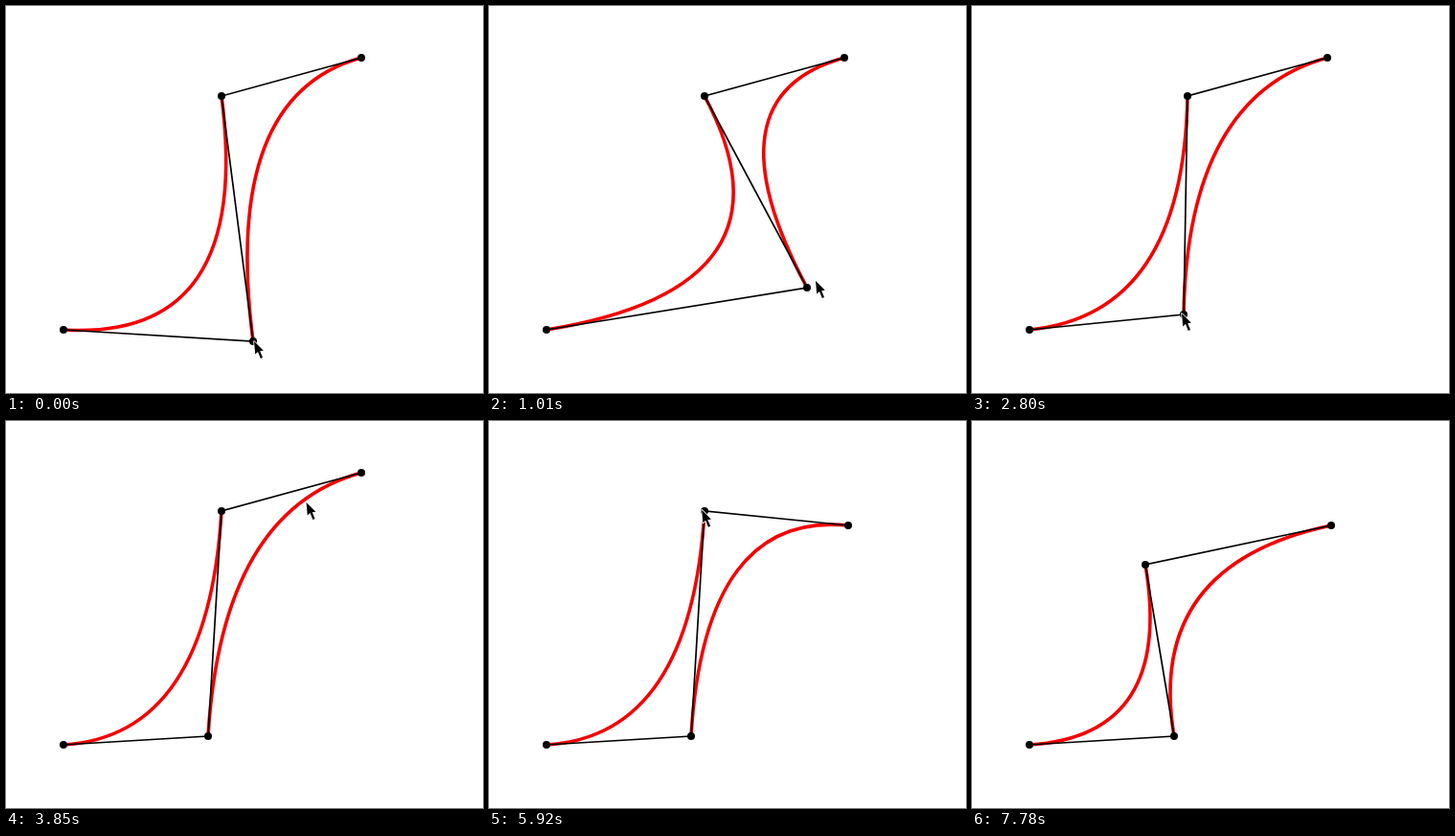
Animation, 498 px wide and 404 px high, one loop 8.15 s. Source, as an HTML page:

```html
<!DOCTYPE html>
<html lang="en">
<head>
<meta charset="utf-8">
<title>Dragging curve handles</title>
<style>
  html, body { margin: 0; width: 100%; height: 100%; overflow: hidden; background: #fff; }
  svg { display: block; width: 498px; height: 404px; }
</style>
</head>
<body>
<svg viewBox="0 0 498 404">
  <g fill="none">
    <path id="curves" stroke="#f40000" stroke-width="3.6"/>
    <path id="arms" stroke="#000" stroke-width="1.7"/>
  </g>
  <g id="dots"></g>
  <path id="pointer" d="M0 0 L1.2 13.5 L4 11 L6.8 18 L9 17 L6.2 10.2 L9.8 9.8 Z"
        stroke="#fff" stroke-width="1.6" paint-order="stroke" stroke-linejoin="round"/>
</svg>
<script>
const LOOP = 8150, START = 450, STEP = 40.5;
const byId = id => document.getElementById(id);

// Pointer path: [step, x, y]
const KEYS = [
  [-1, 259, 350], [13, 333, 294], [14, 341, 287], [21, 349, 272],
  [35, 349, 272], [38, 349, 268], [44, 349, 268],
  [48, 322, 281], [49, 300, 289], [57, 222, 318], [58, 219, 321], [62, 212, 325], [63, 212, 325],
  [86, 324, 74], [96, 372, 54], [100, 372, 54],
  [108, 373, 91], [109, 377, 98], [112, 376, 109], [114, 376, 109],
  [121, 230, 92], [129, 223, 92], [134, 223, 92],
  [145, 181, 137], [146, 180, 139], [152, 179, 148], [157, 179, 148],
  [172, 472, 412]
];

const clamp = (v, lo, hi) => Math.min(hi, Math.max(lo, v));

function secant(i, axis) {
  const a = KEYS[i], b = KEYS[i + 1];
  return a && b ? (b[axis] - a[axis]) / (b[0] - a[0]) : 0;
}

// Harmonic mean keeps the path free of overshoot.
function tangent(i, axis) {
  const before = secant(i - 1, axis), after = secant(i, axis);
  return before * after > 0 ? 2 * before * after / (before + after) : 0;
}

function pointerAt(step) {
  const s = clamp(step, KEYS[0][0], KEYS[KEYS.length - 1][0]);
  let i = 0;
  while (i < KEYS.length - 2 && s > KEYS[i + 1][0]) i++;
  const a = KEYS[i], b = KEYS[i + 1], span = b[0] - a[0];
  const u = (s - a[0]) / span, v = 1 - u;
  return [1, 2].map(axis =>
    v * v * (1 + 2 * u) * a[axis] + u * u * (3 - 2 * u) * b[axis] +
    span * u * v * (v * tangent(i, axis) - u * tangent(i + 1, axis)));
}

// A dragged handle follows one step behind the pointer.
function dragged(step, from, to, dx, dy) {
  const [x, y] = pointerAt(clamp(step - 1, from, to));
  return [x + dx, y + dy];
}

const dots = Array.from({ length: 4 }, () => {
  const dot = document.createElementNS("http://www.w3.org/2000/svg", "circle");
  dot.setAttribute("r", 4);
  return byId("dots").appendChild(dot);
});

function draw(time) {
  const step = Math.floor((time - START) / STEP + 0.2);
  const left = [60, 338];
  const low = step < 40 ? dragged(step, -1, 21, -1, 0) : dragged(step, 44, 62, -1, 4);
  const top = dragged(step, 134, 157, 2, 2);
  const right = dragged(step, 100, 112, -1, 0);
  const points = [left, low, top, right];

  byId("curves").setAttribute("d", `M${left}Q${low} ${top}M${low}Q${top} ${right}`);
  byId("arms").setAttribute("d", "M" + points.join("L"));
  dots.forEach((dot, i) => {
    dot.setAttribute("cx", points[i][0]);
    dot.setAttribute("cy", points[i][1]);
  });
  byId("pointer").setAttribute("transform", `translate(${pointerAt(step)})`);
}

const begin = performance.now();
function tick() {
  draw((performance.now() - begin) % LOOP);
  requestAnimationFrame(tick);
}
tick();
</script>
</body>
</html>
```
